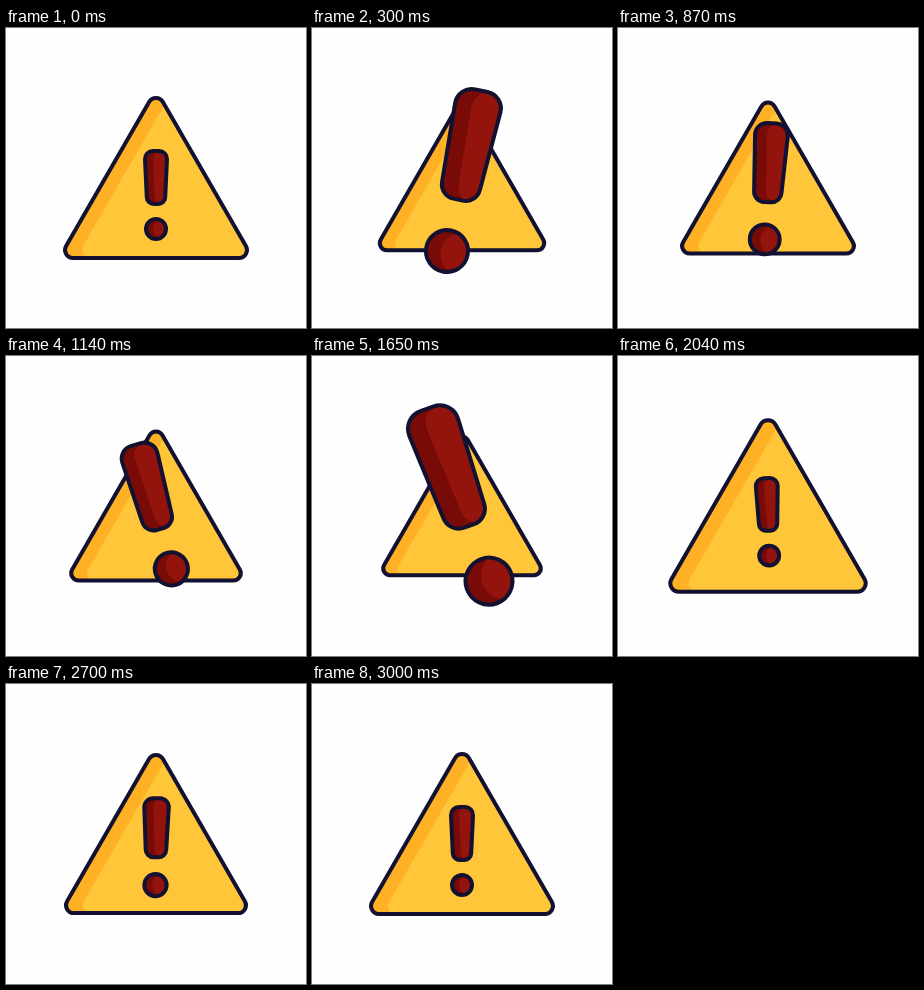
Write an HTML page without scripts that moves like this. It is 300 px wide and 300 px high and loops after 5030 ms.

```html
<!DOCTYPE html>
<html lang="en">
<head>
<meta charset="utf-8">
<title>Warning sign</title>
<style>
  @property --size { syntax: '<number>'; inherits: true; initial-value: 1; }
  @property --tilt { syntax: '<angle>'; inherits: true; initial-value: 0deg; }
  @property --y { syntax: '<length>'; inherits: true; initial-value: 17px; }

  html, body { margin: 0; width: 100%; height: 100%; overflow: hidden; background: #fefefe; }
  svg { display: block; width: 100%; height: 100%; }

  .sign, .mark {
    animation: 5.03s cubic-bezier(.37, 0, .63, 1) infinite;
  }
  .sign {
    animation-name: breathe;
    transform: scale(var(--size));
  }
  .mark {
    animation-name: swell, swing;
    transform: translateY(var(--y)) rotate(var(--tilt)) scale(var(--size));
  }
  /* keeps the outline equally thick at every size */
  .line {
    fill: none;
    stroke: #131132;
    stroke-width: calc(4px / var(--size));
    stroke-linejoin: round;
  }
  .amber { fill: #ffb125; }
  .yellow { fill: #ffc639; }
  .wine { fill: #780b06; }
  .red { fill: #92140c; }

  @keyframes breathe {
    0%, 59.64%, 100% { --size: 1; }
    9.34% { --size: .865; }
    18.59% { --size: .948; }
    32.6% { --size: .866; }
    43.94% { --size: 1.125; }
    50.7% { --size: .985; }
  }
  @keyframes swell {
    0%, 59.64%, 100% { --size: 1; --y: 17px; }
    8.35% { --size: 2.35; --y: 0px; }
    18.29% { --size: 1.47; --y: 11px; }
    32.6% { --size: 2.35; --y: 0px; }
    43.54% { --size: .72; --y: 19px; }
    50.3% { --size: 1.16; --y: 11.7px; }
  }
  @keyframes swing {
    0%, 59.64%, 100% { --tilt: 0deg; }
    10.54% { --tilt: 20deg; }
    25.84%, 32.6% { --tilt: -19.8deg; }
    43.94% { --tilt: 2.5deg; }
  }
</style>
</head>
<body>
<svg viewBox="-150 -150 300 300">
  <defs>
    <path id="tri" d="M-6.9-76A8 8 0 0 1 6.9-76L89.9 68A8 8 0 0 1 83 80H-83A8 8 0 0 1-89.9 68Z"/>
    <path id="bar" d="M-3-44H3A8 8 0 0 1 11-35.7L9.2 2.3A7 7 0 0 1 2.2 9H-2.2A7 7 0 0 1-9.2 2.3L-11-35.7A8 8 0 0 1-3-44Z"/>
    <circle id="dot" cy="34" r="10"/>
    <clipPath id="inTri"><use href="#tri"/></clipPath>
    <clipPath id="inBar"><use href="#bar"/></clipPath>
    <clipPath id="inDot"><use href="#dot"/></clipPath>
  </defs>

  <g class="sign">
    <use href="#tri" class="amber"/>
    <g clip-path="url(#inTri)"><use href="#tri" x="17" class="yellow"/></g>
    <use href="#tri" class="line"/>
  </g>

  <g class="mark">
    <use href="#bar" class="wine"/>
    <g clip-path="url(#inBar)"><use href="#bar" x="8" class="red"/></g>
    <use href="#bar" class="line"/>
    <use href="#dot" class="wine"/>
    <g clip-path="url(#inDot)"><use href="#dot" x="7" class="red"/></g>
    <use href="#dot" class="line"/>
  </g>
</svg>
</body>
</html>
```
